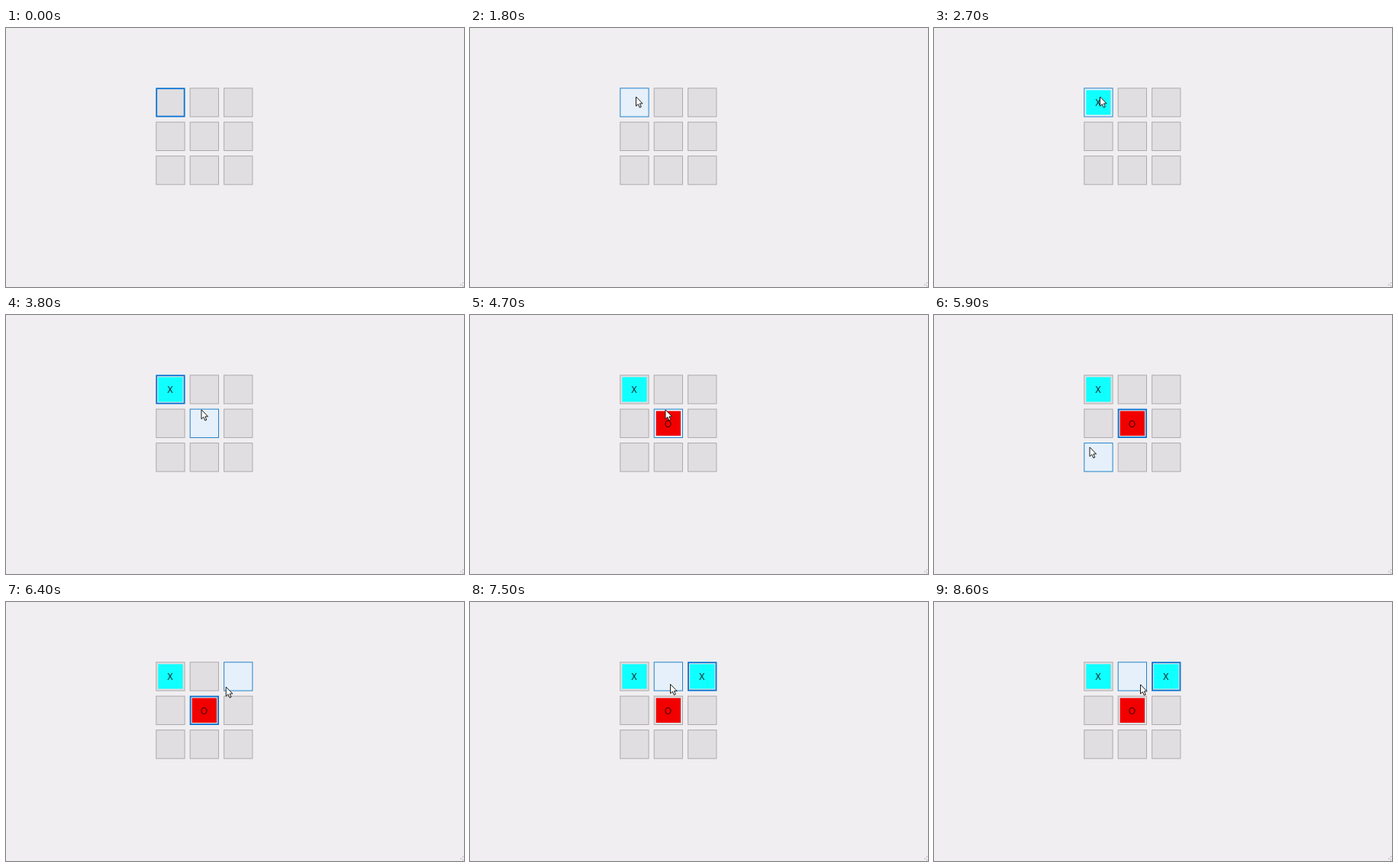
Recreate the animation shown at these times as an HTML page. Size 600x339 px, loop 8.7 s.

```html
<!DOCTYPE html>
<html lang="en">
<head>
<meta charset="utf-8">
<title>Noughts and crosses</title>
<style>
  html, body { margin: 0; height: 100%; overflow: hidden; background: #f0eef0; }
  svg { display: block; width: 100%; height: 100%; }
  text { font: 12.2px "Open Sans", "Noto Sans", sans-serif; text-anchor: middle; }
</style>
</head>
<body>
<svg viewBox="0 0 600 339">
  <g id="board"></g>
  <path d="M599 333L594 338M599 337L598 338" stroke="#b5b3b5" stroke-width="1.5" stroke-dasharray="1.5 2"/>
  <path id="cursor" d="M0 0V12.2L2.8 9.6 4.8 14.1 6.8 13.2 4.9 8.9H8.6Z" fill="#fff" stroke="#1a1a1a" stroke-width="1"/>
</svg>
<script>
const LOOP = 8700, STEP = 100;
const LEFT = 196.3, TOP = 78.3, PITCH = 44.4, SIZE = 38.3;

// Each move eases out along a curve from the previous stop; `via` bends it.
const ENTRY = { x: 235, y: 41 };
const MOVES = [
  { start: 1300, end: 1800, to: { x: 217.5, y: 90 } },
  { start: 2900, end: 3200, to: { x: 256, y: 124 } },
  { start: 5100, end: 5900, to: { x: 204, y: 173 }, via: { x: 175, y: 230 } },
  { start: 5900, end: 6700, to: { x: 302, y: 101 } },
  { start: 7400, end: 8600, to: { x: 270.5, y: 108 }, via: { x: 158, y: 125 } }
];
const CLICKS = [
  { cell: 0, down: 2500, up: 2600, mark: 'X' },
  { cell: 4, down: 4300, up: 4500, mark: 'O' },
  { cell: 2, down: 7000, up: 7200, mark: 'X' }
];
const FILL = { X: '#10ffff', O: '#f20000' };
const INK = { X: '#081818', O: '#400000' };

function set(node, attrs) {
  for (const key in attrs) node.setAttribute(key, attrs[key]);
}
function add(parent, name, attrs) {
  const node = document.createElementNS('http://www.w3.org/2000/svg', name);
  set(node, attrs);
  return parent.appendChild(node);
}

const board = document.getElementById('board');
const cursor = document.getElementById('cursor');
const cells = Array.from({ length: 9 }, (_, i) => {
  const x = LEFT + PITCH * (i % 3), y = TOP + PITCH * Math.floor(i / 3);
  return {
    x, y,
    frame: add(board, 'rect', {}),
    face: add(board, 'rect', { x: x + 3, y: y + 3, width: SIZE - 6, height: SIZE - 6 }),
    label: add(board, 'text', { x: x + SIZE / 2 - .4, y: y + 23.8 })
  };
});

const mix = (a, b, k) => ({ x: a.x + (b.x - a.x) * k, y: a.y + (b.y - a.y) * k });

function pointerAt(t) {
  if (t < MOVES[0].start) return null;
  let spot = ENTRY;
  for (const { start, end, to, via } of MOVES) {
    if (t <= start) break;
    const left = 1 - Math.min(1, (t - start) / (end - start));
    const k = 1 - left * left;
    spot = via ? mix(mix(spot, via, k), mix(via, to, k), k) : mix(spot, to, k);
  }
  return spot;
}

function drawCell(cell, i, t, pointer, focus) {
  const { x, y } = cell;
  const click = CLICKS.find(c => c.cell === i);
  const pressed = click && t >= click.down && t < click.up;
  const mark = click && t >= click.up ? click.mark : '';
  const inside = d => d >= 0 && d < SIZE;
  const hover = pointer && inside(pointer.x - x) && inside(pointer.y - y);

  let fill = '#e0dee0', stroke = '#adabad', line = 1;
  if (pressed) [fill, stroke] = ['#cce4f7', '#005499'];
  else if (hover) [fill, stroke] = ['#e5f0fa', '#2484cc'];
  else if (focus === i) [stroke, line] = ['#0b74d4', 1.8];

  set(cell.frame, {
    x: x + line / 2, y: y + line / 2, width: SIZE - line, height: SIZE - line,
    fill, stroke, 'stroke-width': line
  });
  set(cell.face, { fill: FILL[mark] || 'none' });
  set(cell.label, { fill: INK[mark] || 'none' });
  cell.label.textContent = mark;
}

function draw(now) {
  const t = Math.floor(now % LOOP / STEP) * STEP;
  const pointer = pointerAt(t);
  const focus = CLICKS.reduce((f, c) => t >= c.down ? c.cell : f, 0);
  cells.forEach((cell, i) => drawCell(cell, i, t, pointer, focus));
  set(cursor, { visibility: pointer ? 'visible' : 'hidden' });
  if (pointer) set(cursor, { transform: `translate(${pointer.x} ${pointer.y})` });
}

const start = performance.now();
function tick() {
  draw(performance.now() - start);
  requestAnimationFrame(tick);
}
tick();
</script>
</body>
</html>
```
